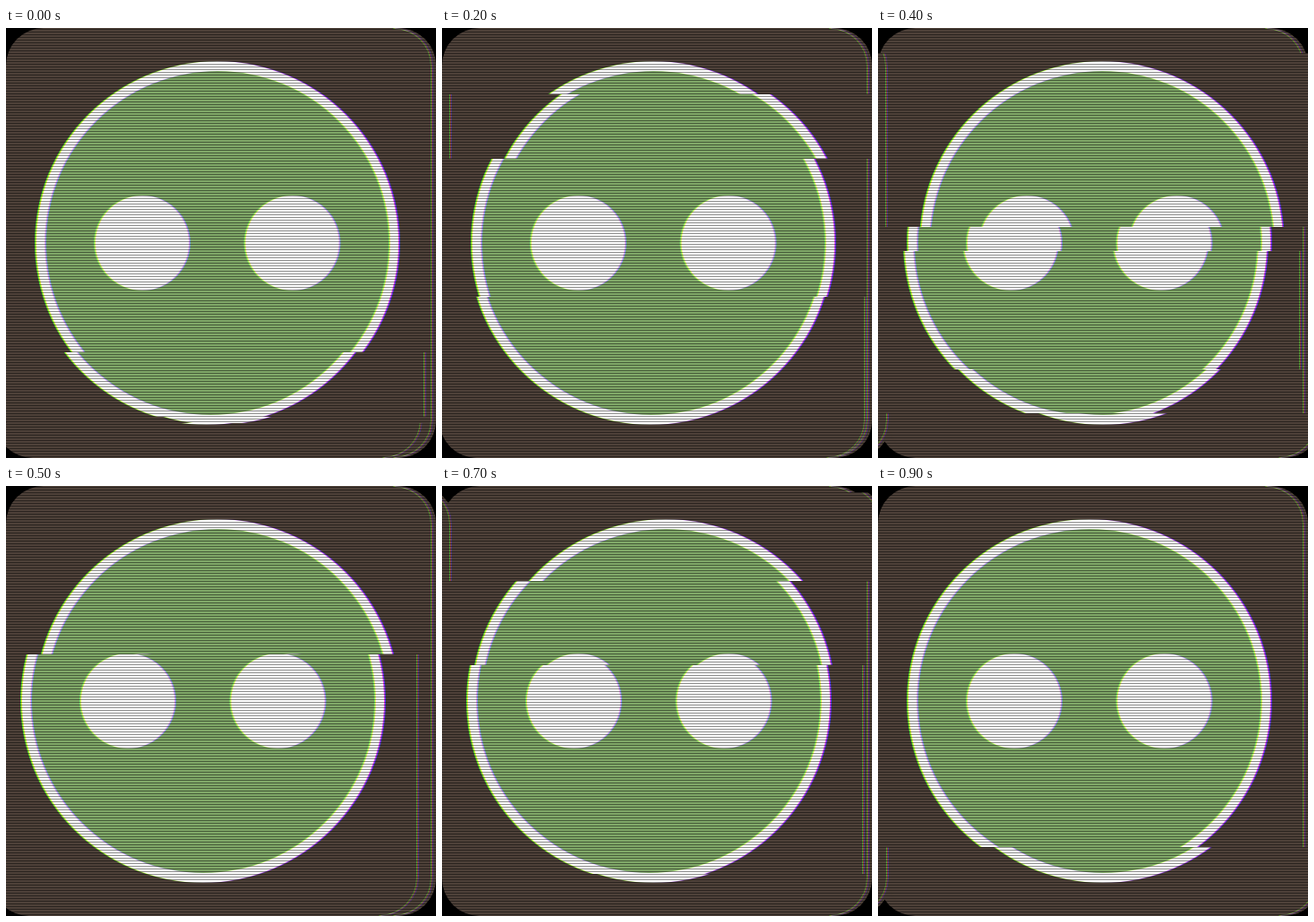
Write an HTML page with a canvas that moves like this. It is 480 px wide and 480 px high and loops after 1 s.

```html
<!DOCTYPE html>
<html lang="en">
<head>
<meta charset="utf-8">
<title>Glitch badge</title>
<style>
html, body { margin: 0; width: 100%; height: 100%; overflow: hidden; background: #000; }
canvas { display: block; width: 480px; height: 480px; }
</style>
</head>
<body>
<canvas id="stage" width="480" height="480"></canvas>
<script>
const SIZE = 480, RADIUS = 42, STEP = 100, BROWN = '#4e4139';
const CHANNELS = [['#f00', -4], ['#0f0', -5], ['#00f', -3]];

// Each pose is a list of bands: [top, shift].
const poses = [
  [[0, 0], [362, -8], [434, 0], [441, -12]],
  [[0, 0], [262, 9], [318, 0]],
  [[0, 0], [74, 14], [146, 0], [300, -3]],
  [[0, 0], [118, -10], [176, 0], [392, 7]],
  [[0, 0], [28, 14], [222, 0], [249, -4], [381, 0], [430, 15]],
  [[0, 0], [188, -16]],
  [[0, 0], [28, -12], [154, 13], [259, 0]],
  [[0, 0], [7, 14], [106, 0], [200, -5], [433, 0]],
  [[0, 0], [330, -6], [388, 0]],
  [[0, 0], [403, 15]]
];

function makeLayer(paint = () => {}) {
  const canvas = document.createElement('canvas');
  canvas.width = canvas.height = SIZE;
  const g = canvas.getContext('2d');
  paint(g);
  return g;
}

function fill(g, color, mode) {
  g.globalCompositeOperation = mode;
  g.fillStyle = color;
  g.fillRect(0, 0, SIZE, SIZE);
  g.globalCompositeOperation = 'source-over';
}

function disc(g, x, r, color) {
  g.fillStyle = color;
  g.beginPath();
  g.arc(x, 240, r, 0, Math.PI * 2);
  g.fill();
}

const card = makeLayer(g => {
  g.beginPath();
  g.roundRect(0, 0, SIZE, SIZE, RADIUS);
  g.clip();
  fill(g, BROWN, 'source-over');
  disc(g, 240, 203, '#fff');
  disc(g, 240, 192, '#80a868');
  disc(g, 156, 53, '#fff');
  disc(g, 323.5, 53, '#fff');
  // Bright rim along the right side.
  const e = SIZE - 0.5;
  g.strokeStyle = '#96a08c';
  g.beginPath();
  g.moveTo(SIZE - RADIUS, 0.5);
  g.arcTo(e, 0.5, e, RADIUS, RADIUS);
  g.arcTo(e, e, SIZE - RADIUS, e, RADIUS);
  g.stroke();
}).canvas;

const scanlines = makeLayer(g => {
  g.fillStyle = 'rgba(0,0,0,.45)';
  for (let y = 1; y < SIZE; y += 3) g.fillRect(0, y, SIZE, 1);
}).canvas;

const ctx = document.getElementById('stage').getContext('2d');
const sliced = makeLayer(), backed = makeLayer(), tinted = makeLayer(), mixed = makeLayer();

// Lays shifted bands over the resting card.
function slice(bands) {
  sliced.clearRect(0, 0, SIZE, SIZE);
  sliced.drawImage(card, 0, 0);
  bands.forEach(([top, shift], i) => {
    if (!shift) return;
    const h = (i + 1 < bands.length ? bands[i + 1][0] : SIZE) - top;
    for (const x of [shift, shift - SIZE])
      sliced.drawImage(card, 0, top, SIZE, h, x, top, SIZE, h);
  });
}

// Splits the colours sideways and keeps the card's outline.
function split() {
  backed.drawImage(sliced.canvas, 0, 0);
  fill(mixed, '#000', 'source-over');
  for (const [color, dx] of CHANNELS) {
    tinted.drawImage(backed.canvas, 0, 0);
    fill(tinted, color, 'multiply');
    mixed.globalCompositeOperation = 'lighter';
    mixed.drawImage(tinted.canvas, dx, 0);
    mixed.drawImage(tinted.canvas, dx + SIZE, 0);
  }
  mixed.globalCompositeOperation = 'destination-in';
  mixed.drawImage(sliced.canvas, 0, 0);
  mixed.globalCompositeOperation = 'source-over';
}

function draw(bands) {
  slice(bands);
  fill(backed, BROWN, 'source-over');
  split();
  fill(ctx, '#000', 'source-over');
  ctx.drawImage(mixed.canvas, 0, 0);
  ctx.drawImage(scanlines, 0, 0);
}

let shown = -1;
const start = performance.now();
function tick() {
  const i = Math.floor((performance.now() - start) / STEP) % poses.length;
  if (i !== shown) draw(poses[shown = i]);
  requestAnimationFrame(tick);
}
tick();
</script>
</body>
</html>
```
